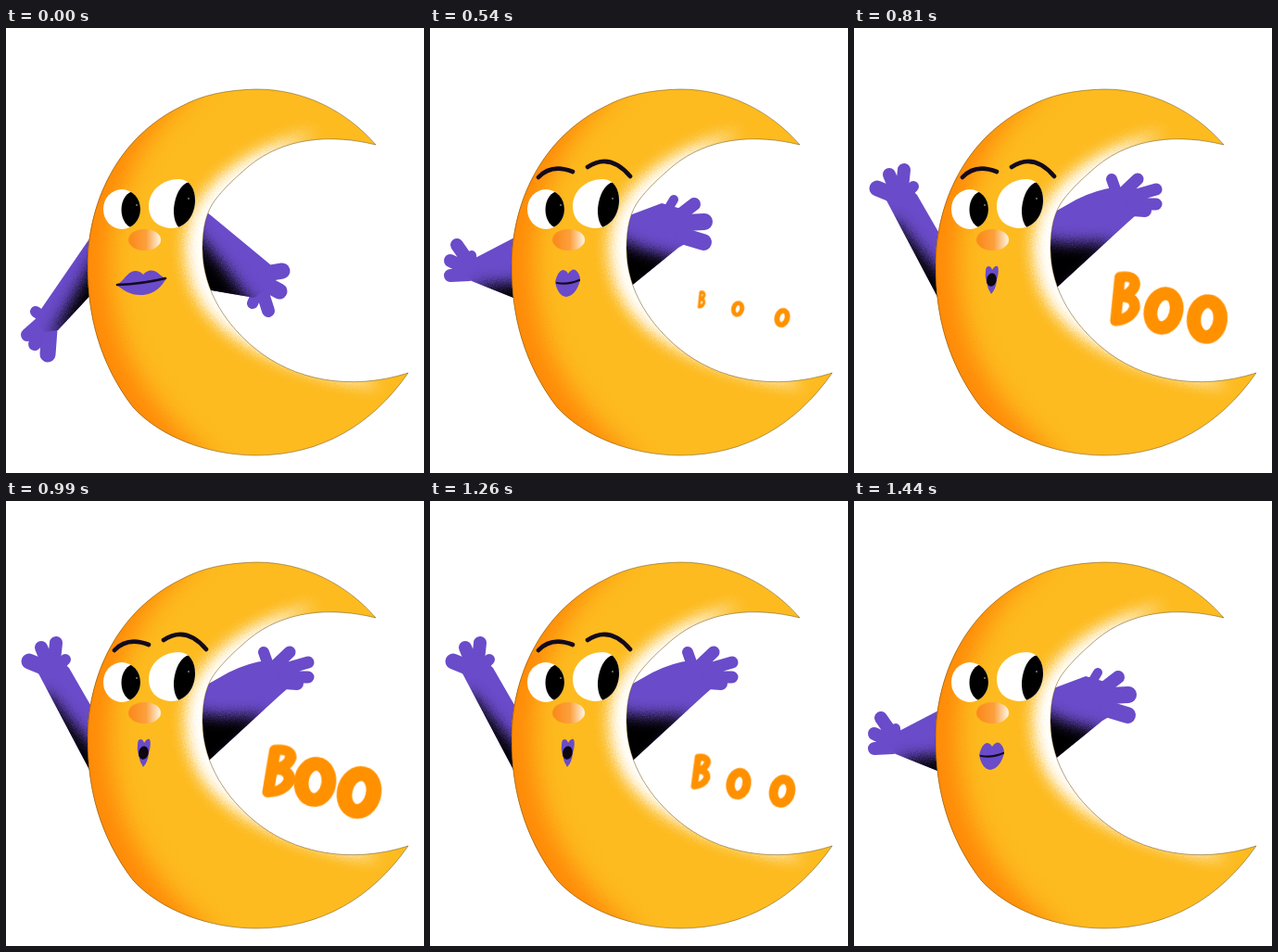
These frames come from a looping animation (451 by 480 pixels, 1.53 s). An HTML page without scripts:

```html
<!DOCTYPE html>
<html lang="en">
<head>
<meta charset="utf-8">
<title>Boo moon</title>
<style>
html, body { margin: 0; width: 100%; height: 100%; overflow: hidden; background: #fff; }
svg { display: block; width: 100vw; height: 100vh; }

.fingers { fill: none; stroke: #6a4bc9; stroke-linecap: round; }
.arm { fill: #6a4bc9; }
.shade { stroke: #000; stroke-width: 16; filter: url(#grain); }
.lips { fill: #6a4bc9; }
.line { fill: none; stroke: #130a1c; stroke-linecap: round; }
.boo { fill: none; stroke: #ff9100; stroke-linejoin: round; stroke-linecap: round; }

/* 17 beats of 90 ms */
.down, .out, .mid, .up, .brow, .boo { opacity: 0; animation: 1530ms step-end infinite; }
.down { animation-name: down; }
.out { animation-name: out; }
.mid { animation-name: mid; }
.up { animation-name: up; }
.brow, .boo { animation-name: late; }
@keyframes down { 0% { opacity: 1 } 29.41%, 100% { opacity: 0 } }
@keyframes out { 0% { opacity: 0 } 29.41% { opacity: 1 } 35.29%, 100% { opacity: 0 } }
@keyframes mid { 0% { opacity: 0 } 35.29% { opacity: 1 } 41.17% { opacity: 0 } 94.11%, 100% { opacity: 1 } }
@keyframes up { 0% { opacity: 0 } 41.17% { opacity: 1 } 94.11%, 100% { opacity: 0 } }
@keyframes late { 0% { opacity: 0 } 35.29% { opacity: 1 } 94.11%, 100% { opacity: 0 } }

/* each letter boils through three drawings, then shrinks */
.boo g { animation: wob 1530ms step-end infinite; }
.b { --a: translate(291px, 292px); --b: translate(294.5px, 291.5px) rotate(1deg) scale(1.14, 1); --c: translate(292px, 292px) rotate(-2deg) scale(1.06, 1.02);
     --m: translate(292px, 292px) scale(.67); --s: translate(293px, 293px) scale(.27, .34); }
.o1 { --a: translate(334.5px, 306.5px) rotate(10deg); --b: translate(333.5px, 303px) rotate(8deg) scale(1.14, 1.06); --c: translate(334px, 305px) rotate(15deg) scale(1.06, 1.02);
      --m: translate(333px, 305px) rotate(12deg) scale(.67); --s: translate(332px, 303px) rotate(14deg) scale(.35); }
.o2 { --a: translate(380.5px, 314px) rotate(12deg); --b: translate(381px, 314.5px) rotate(14deg) scale(1.2, 1.12); --c: translate(381px, 314px) rotate(6deg) scale(1.1, 1.05);
      --m: translate(380px, 313px) rotate(14deg) scale(.7); --s: translate(380px, 312.5px) rotate(16deg) scale(.42); }
@keyframes wob {
  0% { transform: var(--s) }
  41.17%, 58.82%, 76.47% { transform: var(--a) }
  47.05%, 64.7% { transform: var(--b) }
  52.94%, 70.58% { transform: var(--c) }
  82.35% { transform: var(--m) }
  88.23%, 100% { transform: var(--s) }
}
</style>
</head>
<body>
<svg viewBox="0 0 451 480" preserveAspectRatio="none">
<defs>
  <filter id="grain" filterUnits="userSpaceOnUse" x="0" y="0" width="451" height="480" color-interpolation-filters="sRGB">
    <feGaussianBlur in="SourceGraphic" stdDeviation="8" result="soft"/>
    <feTurbulence type="fractalNoise" baseFrequency=".8" numOctaves="2" seed="4"/>
    <feDisplacementMap in="soft" scale="10" xChannelSelector="R" yChannelSelector="G"/>
  </filter>
  <filter id="wide" filterUnits="userSpaceOnUse" x="0" y="0" width="451" height="480" color-interpolation-filters="sRGB">
    <feGaussianBlur in="SourceGraphic" stdDeviation="13" result="soft"/>
    <feTurbulence type="fractalNoise" baseFrequency=".8" numOctaves="2" seed="9"/>
    <feDisplacementMap in="soft" scale="10" xChannelSelector="R" yChannelSelector="G"/>
  </filter>
  <linearGradient id="nose">
    <stop offset=".1" stop-color="#fb8c1e"/>
    <stop offset=".55" stop-color="#fca03c"/>
    <stop offset="1" stop-color="#fff6e8"/>
  </linearGradient>

  <path id="moon" d="M399 126C368 90 322 66 270 66C236 67 212 72 188 85C119 119 88 190 88 257C88 310 101 362 137 409C167 442 220 461 270 461C340 461 395 428 434 372C372 392 310 380 268 345C240 322 212 285 212 238C212 215 216 198 226 185C236 172 248 161 262 149C300 118 350 114 399 126Z"/>
  <clipPath id="inMoon"><use href="#moon"/></clipPath>

  <path id="downArms" d="M95 220L38 303Q30 318 42 328L56 326L95 284ZM210 193L285 255L290 275L268 291L210 281Z"/>
  <path id="outArms" d="M95 222L38 278L30 295L43 309L95 290ZM210 197L285 221L297 245L293 262L275 269L210 282Z"/>
  <path id="midArms" d="M95 224L45 250L36 260L45 273L95 293ZM210 204L250 189L278 197L285 212L280 230L268 237L210 284Z"/>
  <path id="upArms" d="M98 232L68 180L58 170L40 172L35 186L98 305ZM210 202L240 185Q262 174 282 172L300 174L312 195L295 210L210 288Z"/>
  <clipPath id="inDown"><use href="#downArms"/></clipPath>
  <clipPath id="inOut"><use href="#outArms"/></clipPath>
  <clipPath id="inMid"><use href="#midArms"/></clipPath>
  <clipPath id="inUp"><use href="#upArms"/></clipPath>

  <ellipse id="eyeL" cx="125" cy="195.500" rx="20" ry="21.500"/>
  <path id="eyeR" d="M154 192C154 176 168 163 187 163C199 164 204 174 204 186C204 203 193 216 178 216C163 215 154 206 154 192Z"/>
  <clipPath id="inEyeL"><use href="#eyeL"/></clipPath>
  <clipPath id="inEyeR"><use href="#eyeR"/></clipPath>
  <ellipse id="o" rx="13" ry="18.500" stroke-width="14"/>
</defs>

<rect width="451" height="480" fill="#fff"/>

<!-- arms -->
<g class="down">
  <use href="#downArms" class="arm"/>
  <g class="fingers">
    <path stroke-width="12" d="M42 313L32 306M270 288L266 297"/>
    <path stroke-width="14" d="M40 316L23 331M41 321L31 341M276 283L283 305"/>
    <path stroke-width="17" d="M47 325L45 352M280 265L298 262M282 277L295 284"/>
  </g>
  <g clip-path="url(#inDown)"><path class="shade" d="M104 250L66 318L104 300ZM204 232L224 256L256 298L204 298Z"/></g>
</g>
<g class="out">
  <use href="#outArms" class="arm"/>
  <g class="fingers">
    <path stroke-width="12" d="M38 288L31 277M288 230L292 221"/>
    <path stroke-width="14" d="M35 289L16 286M34 298L15 299M280 262L290 272"/>
    <path stroke-width="18" d="M38 305L27 318M288 240L306 240M288 252L301 258"/>
  </g>
  <g clip-path="url(#inOut)"><path class="shade" d="M104 276L56 312L104 304ZM204 234L222 258L262 284L204 296Z"/></g>
</g>
<g class="mid">
  <use href="#midArms" class="arm"/>
  <g class="fingers">
    <path stroke-width="10" d="M46 256L45 245M257 195L263 185"/>
    <path stroke-width="14" d="M45 257L29 234M42 261L22 251M42 266L22 267M272 200L285 190"/>
    <path stroke-width="18" d="M275 210L296 209M275 225L295 231"/>
  </g>
  <g clip-path="url(#inMid)"><path class="shade" d="M52 286L104 282L104 300ZM204 236L226 246L256 254L208 294Z"/></g>
</g>
<g class="up">
  <use href="#upArms" class="arm"/>
  <g class="fingers">
    <path stroke-width="12" d="M57 178L64 171M283 177L278 163"/>
    <path stroke-width="13" d="M288 180L306 163M298 182L326 174M300 190L326 190"/>
    <path stroke-width="14" d="M45 175L38 158M52 172L54 153M300 196L314 197"/>
    <path stroke-width="17" d="M42 180L25 173"/>
  </g>
  <g clip-path="url(#inUp)"><path class="shade" d="M38 212L104 290L96 312ZM204 236L226 240L264 240L208 296Z"/></g>
</g>

<!-- moon -->
<use href="#moon" fill="#fdbb1f"/>
<g clip-path="url(#inMoon)">
  <path filter="url(#wide)" fill="#ff8a08" d="M215 60C140 110 112 190 112 258C114 330 140 400 230 470L40 480V60Z"/>
  <path filter="url(#grain)" fill="#fff" d="M338 112C270 122 193 170 193 235C193 305 240 360 405 388C300 330 250 270 250 235C250 180 290 130 338 112Z"/>
</g>
<use href="#moon" fill="none" stroke="#4a3208" stroke-width=".6" opacity=".7"/>

<!-- face -->
<use href="#eyeL" fill="#fff"/>
<use href="#eyeR" fill="#fff"/>
<ellipse clip-path="url(#inEyeL)" cx="139" cy="196" rx="14.500" ry="20"/>
<g clip-path="url(#inEyeR)"><ellipse cx="195.500" cy="192" rx="14" ry="26" transform="rotate(10 196 192)"/></g>
<g fill="#fff"><circle cx="141" cy="191" r=".7"/><circle cx="197" cy="184" r=".7"/></g>
<ellipse cx="149.500" cy="228.500" rx="17.500" ry="11.500" fill="url(#nose)"/>

<g class="down">
  <path class="lips" d="M119 277C127 274 130 263 139 262Q145 262 148 266Q153 260 160 262C166 264 167 269 173 270C168 279 160 287 148 288C135 289 127 283 119 277Z"/>
  <path class="line" stroke-width="2.600" d="M120 277Q148 276 172 270"/>
</g>
<g class="out">
  <path class="lips" d="M129 275Q138 265 143 263Q147 263 149 267Q153 261 158 262Q162 266 168 268Q162 283 149 287Q139 287 129 275Z"/>
  <path class="line" stroke-width="2.200" d="M130 275.500Q151 277 167 269"/>
  <path class="line" stroke-width="5" d="M112 172Q128 167 145 176M167 159Q194 156 207 173"/>
</g>
<g class="mid">
  <path class="lips" d="M135 274Q138 262 143 261Q147 261 149 265Q153 259 157 261Q162 265 162 272Q158 288 147 290Q138 289 135 274Z"/>
  <path class="line" stroke-width="2.200" d="M137 275Q150 277 161 272"/>
</g>
<g class="up">
  <path class="lips" d="M142 263Q142 257 145 257Q148 257 149 261Q152 256 155 257Q157 262 154 272Q153 282 148 287Q144 281 143 274Q141 268 142 263Z"/>
  <ellipse cx="148.500" cy="271.500" rx="5.300" ry="7.200" fill="#0c0610" transform="rotate(10 148 271)"/>
</g>
<g class="brow">
  <path class="line" stroke="#2b1a0c" stroke-width="4.600" d="M117 161Q131 146 154 155M170 150Q194 134 216 160"/>
</g>

<!-- lettering -->
<g class="boo">
  <g class="b"><path stroke-width="11" d="M-4 -23L-10 23M-4 -23Q11 -25 11 -15Q9 -5 -6 -2Q11 -3 10 10Q5 22 -10 23"/></g>
  <g class="o1"><use href="#o"/></g>
  <g class="o2"><use href="#o"/></g>
</g>
</svg>
</body>
</html>
```
